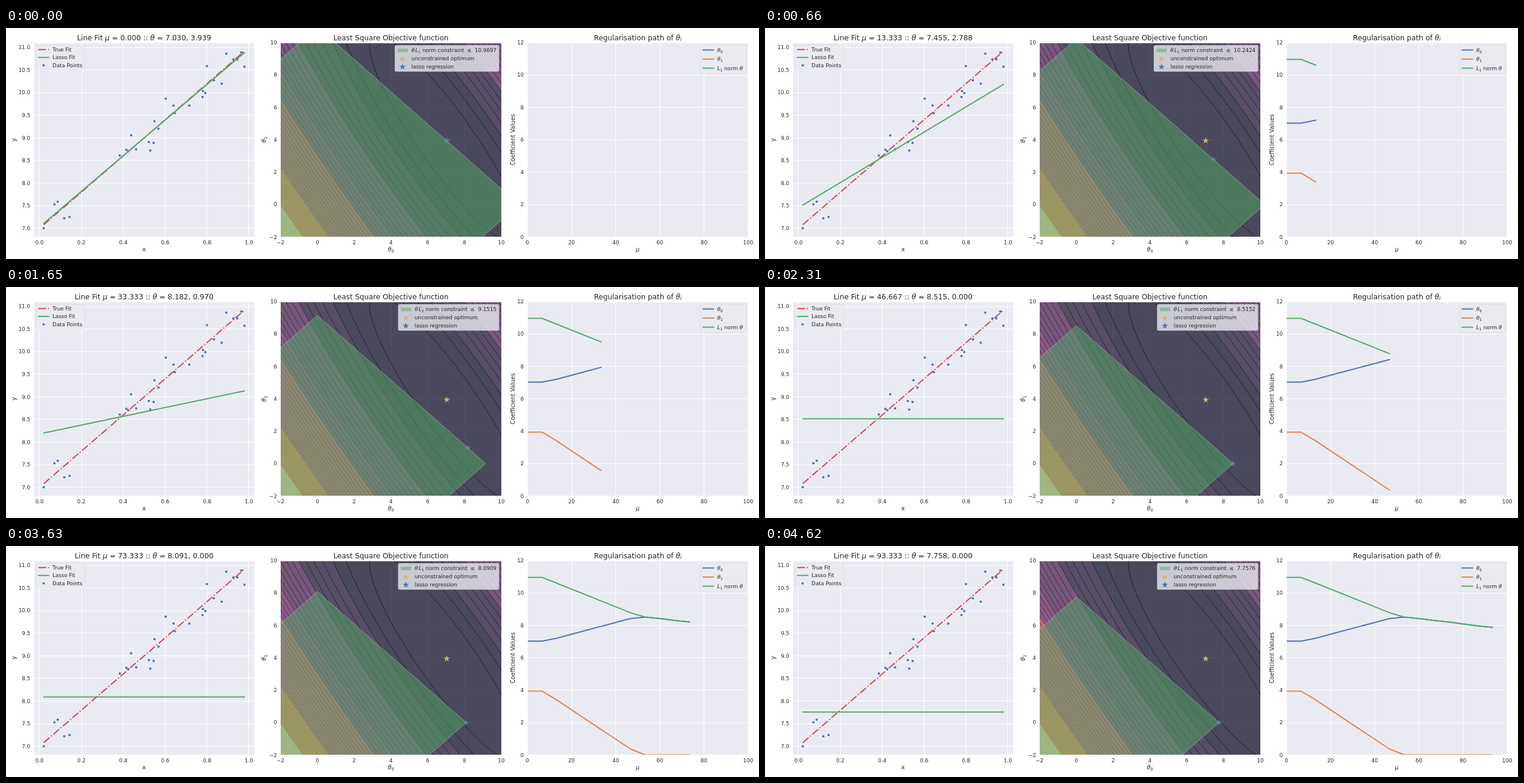
An HTML page for the animation above (4950 ms loop, 1280x394 px).

```html
<!DOCTYPE html>
<html lang="en">
<head>
<meta charset="utf-8">
<title>Lasso regression path</title>
<style>
  html, body { margin: 0; width: 100%; height: 100%; overflow: hidden; background: #fff; }
  svg { display: block; width: 1280px; height: 394px; }
  text { font-family: "DejaVu Sans", sans-serif; fill: #262626; }
  .i { font-style: italic; }
  .grid, .spine { stroke: #fff; stroke-width: 1; fill: none; shape-rendering: crispEdges; }
  .line { fill: none; stroke-width: 2.03; stroke-linecap: round; stroke-linejoin: round; }
  .dash { stroke-linecap: butt; stroke-dasharray: 13 3.26 2.03 3.26; }
  .box { fill: #eaeaf2; fill-opacity: .8; stroke: #ccc; stroke-opacity: .5; stroke-width: .8; }
</style>
</head>
<body>
<svg id="stage" viewBox="0 0 1280 394" xmlns="http://www.w3.org/2000/svg"></svg>
<script>
const BLUE = '#4c72b0', ORANGE = '#dd8452', GREEN = '#55a868', RED = '#c44e52', SAND = '#ccb974';
const TICK = 8.95, LABEL = 9.76, TITLE = 12.25;
const TOP = 25, BOTTOM = 356.3, WIDTH = 375.3, HEIGHT = BOTTOM - TOP, PITCH = 419.6;
const STEP = 330, COUNT = 15;

const range = (a, b, s) => Array.from({ length: Math.round((b - a) / s) + 1 }, (_, i) => a + i * s);
const steps = range(0, COUNT - 1, 1);
const muAt = k => k * 20 / 3;

// Lasso solution: piecewise linear in the penalty, rounded to a grid of 1/33
const theta0 = steps.map(k => Math.round(Math.min(Math.max(232, 230 + 8 * k), 306.6 - 3.6 * k)) / 33);
const theta1 = steps.map(k => Math.max(0, Math.min(130, 132 - 20 * k)) / 33);
const norm = steps.map(k => theta0[k] + theta1[k]);

// Mersenne twister, one block of 624 words, giving 53-bit uniforms
function twister(seed) {
  const n = 624, s = [seed >>> 0];
  for (let i = 1; i < n; i++) s[i] = (Math.imul(1812433253, s[i - 1] ^ (s[i - 1] >>> 30)) + i) >>> 0;
  for (let i = 0; i < n; i++) {
    const y = (s[i] & 0x80000000) | (s[(i + 1) % n] & 0x7fffffff);
    s[i] = s[(i + 397) % n] ^ (y >>> 1) ^ (y & 1 ? 0x9908b0df : 0);
  }
  let at = 0;
  const word = () => {
    let y = s[at++ % n];
    y ^= y >>> 11;
    y ^= (y << 7) & 0x9d2c5680;
    y ^= (y << 15) & 0xefc60000;
    return (y ^ (y >>> 18)) >>> 0;
  };
  return () => ((word() >>> 5) * 2 ** 26 + (word() >>> 6)) / 2 ** 53;
}

// Pair of normal deviates by the polar method
function gaussPair(random) {
  let u, v, r;
  do {
    u = 2 * random() - 1;
    v = 2 * random() - 1;
    r = u * u + v * v;
  } while (r >= 1 || r === 0);
  const f = Math.sqrt(-2 * Math.log(r) / r);
  return [f * v, f * u];
}

// Noisy samples of y = 7 + 4x
const N = 30, random = twister(0);
const xs = Array.from({ length: N }, random);
const noise = Array.from({ length: N / 2 }, () => gaussPair(random)).flat();
const ys = xs.map((x, i) => 7 + 4 * x + .2 * noise[i]);
const xMin = Math.min(...xs), xMax = Math.max(...xs);

const scale = (a, b, pa, pb) => v => pa + (v - a) * (pb - pa) / (b - a);
function axesOf(i, x0, x1, y0, y1) {
  const left = 47.1 + i * PITCH;
  return { left, mid: left + WIDTH / 2, x: scale(x0, x1, left, left + WIDTH), y: scale(y0, y1, BOTTOM, TOP) };
}
const pad = .05 * (xMax - xMin);
const fit = axesOf(0, xMin - pad, xMax + pad, 6.81, 11.104);
const loss = axesOf(1, -2, 10, -2, 10);
const path = axesOf(2, 0, 100, 0, 12);

const it = s => `<tspan class="i">${s}</tspan>`;
const sub = s => `<tspan dy="1.8" font-size="70%">${s}</tspan>`;
const text = (x, y, size, s, anchor = 'start', extra = '') =>
  `<text x="${x}" y="${y}" font-size="${size}" text-anchor="${anchor}" ${extra}>${s}</text>`;
const upright = (x, s) => text(0, 0, LABEL, s, 'middle', `transform="translate(${x} 190.6) rotate(-90)"`);
const below = (ax, s) => text(ax.mid, 380.8, LABEL, s, 'middle');
const heading = (ax, s, id = '') => text(ax.mid, 20.6, TITLE, s, 'middle', id);
const line = (x1, x2, y, color, cls = '') => `<path class="line ${cls}" stroke="${color}" d="M${x1} ${y}H${x2}"/>`;
const box = (x, y, w, h, id = '') => `<rect ${id} class="box" x="${x}" y="${y}" width="${w}" height="${h}" rx="2"/>`;
const dot = (x, y) => `<circle cx="${x}" cy="${y}" r="2" fill="${BLUE}"/>`;
const frame = (ax, attrs) => `<rect x="${ax.left}" y="${TOP}" width="${WIDTH}" height="${HEIGHT}" ${attrs}/>`;
const clip = (id, ax) => `<clipPath id="${id}">${frame(ax, '')}</clipPath>`;

function star(cx, cy, r = 5.8) {
  return range(0, 9, 1).map(i => {
    const a = i * Math.PI / 5, q = i % 2 ? r * .382 : r;
    return `${cx + q * Math.sin(a)},${cy - q * Math.cos(a)}`;
  }).join(' ');
}

const gridPath = (ax, gx, gy) =>
  gx.map(v => `M${ax.x(v)} ${TOP}v${HEIGHT}`).join('') + gy.map(v => `M${ax.left} ${ax.y(v)}h${WIDTH}`).join('');

function panel(ax, gx, gy, digits, content) {
  const num = v => v.toFixed(digits).replace('-', '\u2212');
  return frame(ax, 'fill="#eaeaf2" shape-rendering="crispEdges"') +
    `<path class="grid" d="${gridPath(ax, gx, gy)}"/>` +
    gx.map(v => text(ax.x(v), 369.3, TICK, num(v), 'middle')).join('') +
    gy.map(v => text(ax.left - 6, ax.y(v) + 3.2, TICK, num(v), 'end')).join('') +
    content.plot + frame(ax, 'class="spine"') + content.labels;
}

// Fill colours of the squared error, each up to its limit
const bands = [
  [300, '#4a495b'], [750, '#574e65'], [1350, '#76577c'], [1700, '#8c5a86'],
  [3000, '#c8687c'], [3900, '#f08c64'], [4800, '#f1cea4']
];
const shade = v => bands.find(b => v <= b[0])[1];

// Level sets of the squared error: circles under one skewing matrix
function contours() {
  const mean = f => xs.reduce((s, x, i) => s + f(x, ys[i]), 0) / N;
  const mx = mean(x => x), my = mean((x, y) => y);
  const sd = Math.sqrt(mean(x => (x - mx) ** 2));
  const slope = mean((x, y) => (x - mx) * (y - my)) / sd ** 2, base = my - slope * mx;
  const rest = mean((x, y) => (y - base - slope * x) ** 2);
  const sx = WIDTH / 12, sy = HEIGHT / 12;
  const matrix = [sx, 0, -sx * mx / sd, -sy / sd, loss.x(base), loss.y(slope)];
  const rings = range(100, 4800, 100).reverse().map(v =>
    `<circle r="${Math.sqrt(v / N - rest)}" fill="${shade(v)}" stroke="#000" stroke-width=".8"
      stroke-opacity="${.75 * (1 - v / 6000)}" vector-effect="non-scaling-stroke"/>`);
  return `<g transform="matrix(${matrix})">${rings.join('')}</g>`;
}

const fitLine = (a, b) => `M${fit.x(xMin)} ${fit.y(a + b * xMin)}L${fit.x(xMax)} ${fit.y(a + b * xMax)}`;

const fitPanel = panel(fit, range(0, 1, .2), range(7, 11, .5), 1, {
  plot: xs.map((x, i) => dot(fit.x(x), fit.y(ys[i]))).join('') +
    `<path class="line dash" stroke="${RED}" d="${fitLine(7, 4)}"/>` +
    `<path class="line" id="lasso" stroke="${GREEN}"/>`,
  labels: box(51.3, 29.5, 82.5, 41.5) +
    line(55, 73, 36.8, RED, 'dash') + line(55, 73, 50.2, GREEN) + dot(64, 63.8) +
    ['True Fit', 'Lasso Fit', 'Data Points'].map((s, i) => text(79, 40 + i * 13.4, TICK, s)).join('') +
    below(fit, 'x') + upright(17, 'y') + heading(fit, '', 'id="title"')
});

const even = range(-2, 10, 2);
const optimum = star(loss.x(theta0[0]), loss.y(theta1[0]));
const lossPanel = panel(loss, even, even, 0, {
  plot: `<g clip-path="url(#inLoss)">${contours()}
    <path class="grid" stroke-opacity=".04" d="${gridPath(loss, even, even)}"/>
    <polygon points="${optimum}" fill="${SAND}"/>
    <polygon id="best" fill="${BLUE}"/>
    <polygon id="ball" fill="${GREEN}" fill-opacity=".5" stroke="#ddd" stroke-opacity=".45"/></g>`,
  labels: box(661, 29.5, 177, 44.7, 'id="lossBox"') +
    `<g id="lossKey"><rect x="665.5" y="35.2" width="17.5" height="6" fill="${GREEN}" fill-opacity=".5"/>
    <polygon points="${star(674, 53)}" fill="${SAND}"/><polygon points="${star(674, 66.2)}" fill="${BLUE}"/>` +
    text(689, 41, TICK, `${it('θ')}<tspan dx="1.4" class="i">L</tspan>${sub(1)}<tspan dy="-1.8"> norm constraint</tspan>`) +
    text(689, 55.3, TICK, 'unconstrained optimum') + text(689, 68.8, TICK, 'lasso regression') + '</g>' +
    text(833.8, 41, TICK, '', 'end', 'id="bound"') +
    below(loss, it('θ') + sub(0)) + upright(442, it('θ') + sub(1)) +
    heading(loss, 'Least Square Objective function')
});

const curves = [
  [BLUE, theta0, it('θ') + sub(0)],
  [ORANGE, theta1, it('θ') + sub(1)],
  [GREEN, norm, `${it('L')}${sub(1)}<tspan dy="-1.8"> norm </tspan>${it('θ')}`]
];
const pathPanel = panel(path, range(0, 100, 20), range(0, 12, 2), 0, {
  plot: `<g clip-path="url(#inPath)">${curves.map(([c], i) => `<path class="line" id="curve${i}" stroke="${c}"/>`).join('')}</g>`,
  labels: box(1181, 29.5, 77, 48.7) +
    curves.map(([c, , s], i) => line(1185, 1203, 37.6 + i * 15.5, c) + text(1209, 40.9 + i * 15.5, TICK, s)).join('') +
    below(path, it('μ')) + upright(865, 'Coefficient Values') +
    heading(path, 'Regularisation path of ' + it('θ') + it(sub('i')))
});

const $ = id => document.getElementById(id);
const set = (id, name, v) => $(id).setAttribute(name, v);
$('stage').innerHTML = `<defs>${clip('inLoss', loss)}${clip('inPath', path)}</defs>` + fitPanel + lossPanel + pathPanel;

// The path shows each value one step late
function trail(values, k) {
  if (!k) return '';
  return 'M' + range(0, k, 1).map(i => `${path.x(muAt(i))} ${path.y(values[Math.max(0, i - 1)])}`).join('L');
}

function draw(k) {
  const a = theta0[k], b = theta1[k], r = norm[k];
  $('title').innerHTML = `Line Fit ${it('μ')} = ${muAt(k).toFixed(3)} :: ${it('θ')} = ${a.toFixed(3)}, ${b.toFixed(3)}`;
  set('lasso', 'd', fitLine(a, b));
  set('best', 'points', star(loss.x(a), loss.y(b)));
  set('ball', 'points', [[r, 0], [0, r], [-r, 0], [0, -r]].map(([x, y]) => `${loss.x(x)},${loss.y(y)}`).join(' '));
  $('bound').textContent = '≤ \u00a0' + r.toFixed(4);
  const shift = r < 10 ? 5.7 : 0;
  set('lossKey', 'transform', `translate(${shift} 0)`);
  set('lossBox', 'x', 661 + shift);
  set('lossBox', 'width', 177 - shift);
  curves.forEach(([, v], i) => set('curve' + i, 'd', trail(v, k)));
}

const start = performance.now();
let shown = -1;
function tick() {
  const k = Math.floor((performance.now() - start) / STEP) % COUNT;
  if (k !== shown) draw(shown = k);
  requestAnimationFrame(tick);
}
tick();
</script>
</body>
</html>
```
